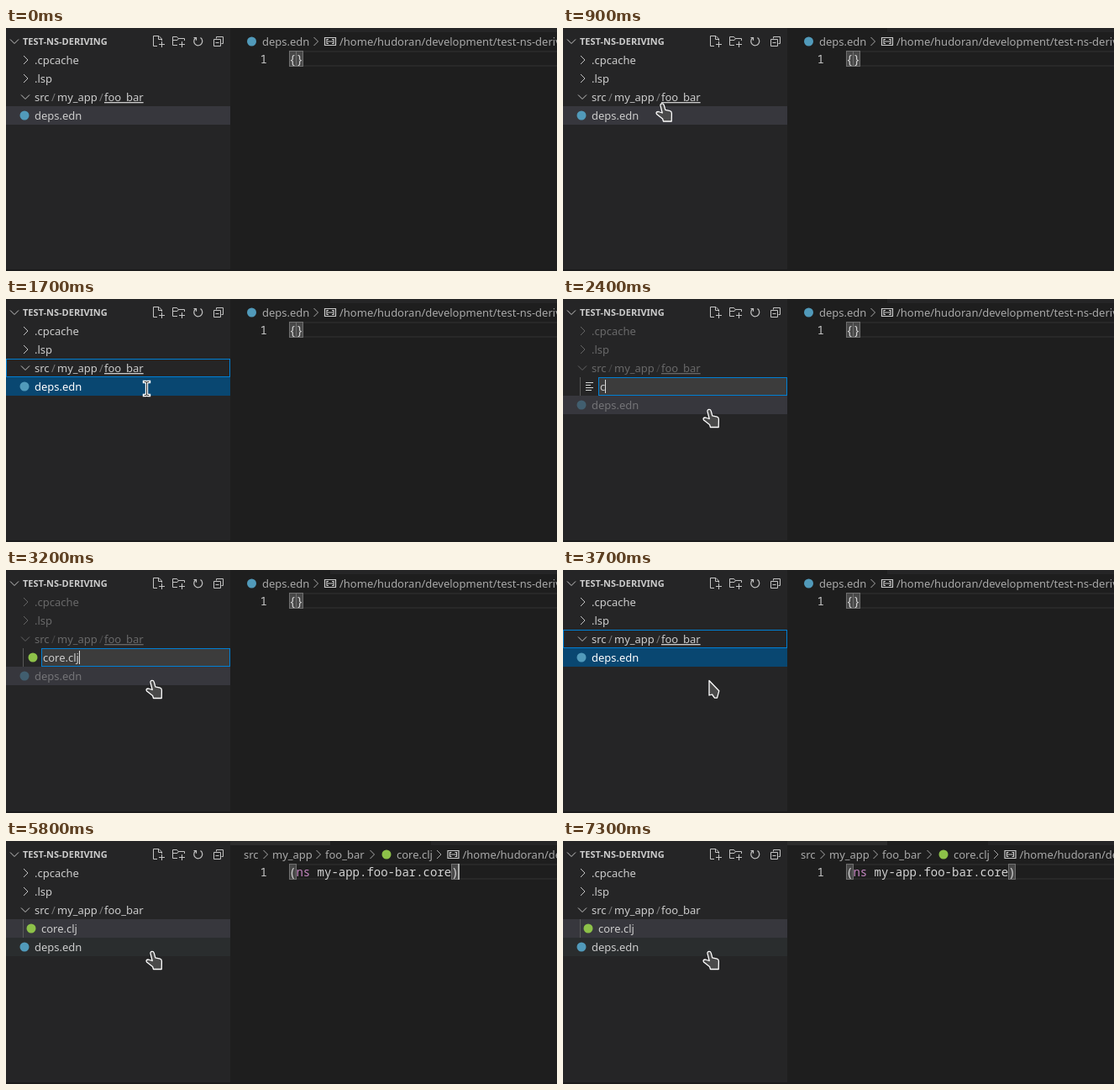
Recreate the animation shown at these times as an HTML page. Size 656x289 px, loop 7.5 s.

```html
<!DOCTYPE html>
<html lang="en">
<head>
<meta charset="utf-8">
<title>New file in the explorer</title>
<style>
  html, body { margin: 0; width: 100%; height: 100%; overflow: hidden; background: #1e1e1e; }
  svg { display: block; width: 656px; height: 289px; font: 13px "Noto Sans", sans-serif; }
  text { white-space: pre; }
  .code { font: 14px "Noto Sans Mono", monospace; }
  .menu { font-size: 15px; }
</style>
</head>
<body>
<svg id="stage" viewBox="0 0 656 289"></svg>
<script>
const LOOP = 7500, STEP = 100;
const BLUE = '#519aba', GREEN = '#8dc149', FG = '#cccccc', CRUMB = '#a9a9a9';
const stage = document.getElementById('stage');
const ruler = document.createElement('canvas').getContext('2d');
ruler.font = '13px "Noto Sans", sans-serif';

const rect = (x, y, w, h, fill, extra = '') =>
  `<rect x="${x}" y="${y}" width="${w}" height="${h}" fill="${fill}" ${extra}/>`;
const frame = (x, y, w, h, color, fill = 'none') =>
  rect(x + .5, y + .5, w - 1, h - 1, fill, `stroke="${color}"`);
const text = (x, y, s, fill = FG, extra = '') =>
  `<text x="${x}" y="${y}" fill="${fill}" ${extra}>${s}</text>`;
const line = (d, color = '#c5c5c5', extra = '') =>
  `<path d="${d}" fill="none" stroke="${color}" ${extra}/>`;
const dot = (x, y, fill) => `<circle cx="${x}" cy="${y}" r="5.5" fill="${fill}"/>`;
const right = (x, y, color) => line(`M${x - 2.5} ${y - 5}l5 5l-5 5`, color);
const down = (x, y) => line(`M${x - 5} ${y - 2.5}l5 5l5 -5`);

// Mouse pointer: [time, shape, x, y], held until the next entry
const pointer = [
  [0, 'none', 0, 0], [300, 'hand', 128, 104], [400, 'hand', 132, 68],
  [700, 'hand', 126, 71], [800, 'hand', 117, 79], [900, 'hand', 110, 89],
  [1100, 'hand', 114, 87], [1200, 'hand', 129.5, 79], [1300, 'arrow', 151, 92],
  [1400, 'arrow', 166, 102], [1500, 'arrow', 165, 103], [1700, 'beam', 163.5, 97],
  [1800, 'arrow', 171, 118], [2000, 'hand', 166, 130.5], [3700, 'arrow', 173, 130.5],
  [3800, 'hand', 166, 130.5]
];
const typed = [
  [1900, ''], [2400, 'c'], [2500, 'co'], [2700, 'cor'], [2800, 'core'],
  [3000, 'core.c'], [3100, 'core.cl'], [3200, 'core.clj']
];
const at = (keys, t) => keys.filter(k => k[0] <= t).pop();

const outline = d => `<path d="${d}" fill="#4a4a4a" stroke="#fff" stroke-width="1.3" stroke-linejoin="round"/>`;
const beam = 'M1 1.5H3Q4 1.5 4 3V16Q4 17.5 3 17.5H1M7 1.5H5Q4 1.5 4 3M4 16Q4 17.5 5 17.5H7';
const shapes = {
  none: '',
  hand: outline('M6 3.2C5.5 .5 9.6 0 10.3 2.8L11.8 8.4L17.5 9.6Q19.4 10.2 19.4 12.5L19.2 22H9.5L8.6 19L1.6 13.6Q-.2 10.6 3.6 10.5L8.2 12Z'),
  arrow: outline('M1 1V18.5L4.5 17.5L7.5 21.7H10.5L12.8 13.2Z'),
  beam: line(beam, '#fff', 'stroke-width="3.4" stroke-linecap="square"') +
        line(beam, '#333', 'stroke-width="1.1"')
};

function header() {
  return down(10, 16) +
    text(20, 20, 'TEST-NS-DERIVING', FG, 'font-size="11" font-weight="700"') +
    line('M180 21.5H175.5V9.5H182L185.5 13V15M181.5 9.5V13.5H185.5M185.5 16V23M182 19.5H189') +
    line('M204 20.5H198.5V10.5H203.5L205 12.5H212.5V15M198.5 14.5H204L205.5 12.5M209.5 16V23M206 19.5H213') +
    line('M225.5 12A5 5 0 1 0 231.5 11.6M223.5 11.5H226.5V14.8', '#c5c5c5', 'stroke-width="1.2"') +
    line('M250.5 12.5V10.5H258.5V18.5H256.5M247.5 13.5H255.5V21.5H247.5ZM249.5 17.5H253.5');
}

function folders(underlined) {
  const slash = x => text(x, 87, '/', '#777');
  return right(23.5, 38) + text(34, 43, '.cpcache') +
    right(23.5, 60) + text(34, 65, '.lsp') +
    down(23, 82) + text(34, 87, 'src') + slash(54) + text(61, 87, 'my_app') + slash(111) +
    text(117, 87, 'foo_bar', FG, underlined ? 'text-decoration="underline"' : '');
}

const deps = (y, color = FG) => dot(22, y, BLUE) + text(34, y + 5, 'deps.edn', color);
const guide = () => rect(20, 93, 1, 22, '#585858');

function nameInput(name) {
  const icon = name.endsWith('.clj')
    ? dot(32, 104, GREEN)
    : line('M27 99.5H36M27 102.5H33M27 105.5H36M27 108.5H34', '#d4d7d6');
  return guide() + icon + frame(42, 93, 225, 22, '#007fd4', '#3c3c3c') +
    text(44, 109, name) +
    rect(Math.round(44 + ruler.measureText(name).width), 96, 1, 16, '#e0e0e0');
}

function explorer(t) {
  const opened = t >= 3900, added = t >= 3800;
  const editing = t >= 1900 && t < 3700;
  const focused = t >= 1000 && !editing && !opened;
  const y = editing || added ? 126 : 104;
  const rowColor = focused ? '#094771' : opened ? '#2a2d2e' : '#37373d';
  let out = rect(0, 0, 267, 289, '#252526') + header() + rect(0, y - 11, 267, 22, rowColor);
  if (opened) out += rect(0, 93, 267, 22, '#37373d');
  out += `<g opacity="${editing ? .4 : 1}">${folders(!opened)}${deps(y, focused ? '#fff' : FG)}</g>`;
  if (focused) out += frame(0, 71, 267, 22, '#007fd4');
  if (editing) out += nameInput(at(typed, t)[1]);
  if (added) out += guide() + dot(30, 104, GREEN) + text(42, 109, 'core.clj');
  return out;
}

function pathCrumb(x) {
  return right(x - 28, 16, CRUMB) +
    line(`M${x - 17.5} 11.5h13v9h-13zM${x - 13} 13.5h-2v5h2M${x - 9} 13.5h2v5h-2M${x - 14} 16h6`, '#ccc', 'stroke-width="1.2"') +
    text(x, 21, '/home/hudoran/development/test-ns-deriving', CRUMB);
}

const bracket = x => frame(x, 27, 9, 19, '#6f6f6f', '#484848');
const code = (x, s, color = '#d4d4d4') => text(x, 42, s, color, 'class="code"');

function editor(t) {
  const crumb = (x, s) => text(x, 21, s, CRUMB);
  let out = rect(337, 27, 319, 2, '#282828') + rect(337, 44, 319, 2, '#282828') +
    code(302.5, '1', '#c6c6c6');
  if (t < 3900) {
    return out + rect(386, 0, 270, 5, '#252526') + dot(292.5, 16, BLUE) +
      crumb(305, 'deps.edn') + pathCrumb(397) +
      bracket(337) + bracket(345) + code(337, '{}');
  }
  out += rect(267, 0, 119, 5, '#2d2d2d') + rect(506, 0, 150, 5, '#252526') +
    crumb(283, 'src') + right(309, 16, CRUMB) + crumb(317, 'my_app') + right(372, 16, CRUMB) +
    crumb(380, 'foo_bar') + right(436, 16, CRUMB) +
    dot(453, 16, GREEN) + crumb(465, 'core.clj') + pathCrumb(543.5) +
    bracket(337) + bracket(530) +
    code(337, '(<tspan fill="#c586c0">ns</tspan> my-app.foo-bar.core)');
  const caretOn = Math.floor((t - 3800) / 500) % 2 === 0;
  return caretOn ? out + rect(538, 27, 2, 19, '#aeafad') : out;
}

function menu(t) {
  const items = [
    [116, 'New File', ''], [146, 'New Folder', ''],
    [176, 'Open Containing Folder', 'Alt+Ctrl+R'], [206, 'Open in Integrated Terminal', ''],
    [247, 'Find in Folder...', 'Alt+Shift+F'], [288, 'Cut', 'Ctrl+X']
  ];
  const hovered = t >= 1400 ? rect(118, 96, 359, 30, '#094771') : '';
  return rect(118, 92, 359, 210, '#2f2f30', 'style="filter:drop-shadow(0 2px 3px #000)"') + hovered +
    rect(118, 220, 359, 1, '#3a3a3b') + rect(118, 261, 359, 1, '#3a3a3b') +
    '<g class="menu">' + items.map(([y, label, keys]) =>
      text(142, y, label, '#f0f0f0') + text(454, y, keys, '#949495', 'text-anchor="end"')).join('') + '</g>';
}

function draw(t) {
  const [, shape, x, y] = at(pointer, t);
  stage.innerHTML = rect(0, 0, 656, 289, '#1e1e1e') + editor(t) + explorer(t) +
    rect(0, 287, 656, 2, '#1b1b1c') +
    (t >= 1100 && t < 1700 ? menu(t) : '') +
    `<g transform="translate(${x} ${y})">${shapes[shape]}</g>`;
}

let shown = -1;
function tick() {
  const t = Math.floor(performance.now() % LOOP / STEP) * STEP;
  if (t !== shown) draw(shown = t);
  requestAnimationFrame(tick);
}
tick();
</script>
</body>
</html>
```
